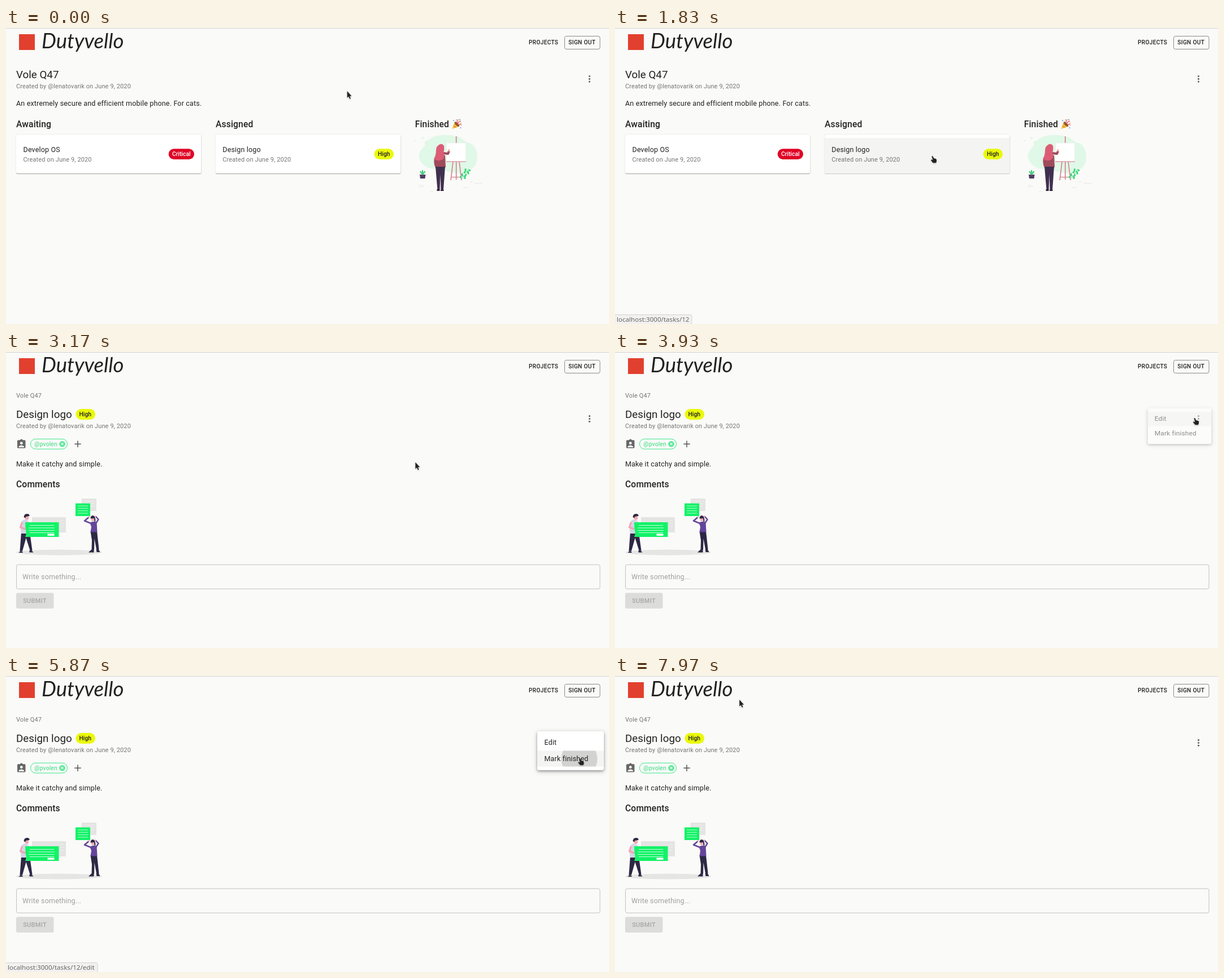
Recreate the animation shown at these times as an HTML page. Size 1067 by 525 pixels, loop 8000 ms.

```html
<!DOCTYPE html>
<html lang="en">
<head>
<meta charset="utf-8">
<title>Task board</title>
<style>
html, body { margin: 0; width: 100%; height: 100%; overflow: hidden; background: #fafaf8; }
svg { display: block; width: 100%; height: 100%; }
text { font-family: Roboto, sans-serif; fill: #212121; white-space: pre; }
.h5 { font-size: 18.8px; }
.h6 { font-size: 15.64px; font-weight: 500; letter-spacing: .009em; }
.b1 { font-size: 12.52px; letter-spacing: .013em; }
.b2 { font-size: 10.95px; letter-spacing: .0125em; fill: #757575; }
.btn { font-size: 10.17px; font-weight: 500; letter-spacing: .0286em; }
.chip { font-size: 10.3px; font-weight: 500; text-anchor: middle; }
.brand { font: italic 36.5px Lato, sans-serif; }
.url { font: 11.6px "Noto Sans", sans-serif; fill: #666; }
.card { fill: #fff; filter: drop-shadow(0 1px .7px rgba(0,0,0,.3)) drop-shadow(0 0 1px rgba(0,0,0,.12)); }
.paper { fill: #fff; filter: drop-shadow(0 2px 2px rgba(0,0,0,.32)) drop-shadow(0 2px 5px rgba(0,0,0,.16)); }
.pointer { filter: drop-shadow(.5px 1px .8px rgba(0,0,0,.22)); }
.pointer path { fill: #222; stroke: #fff; stroke-width: .7; paint-order: stroke; }
</style>
</head>
<body>
<svg viewBox="0 0 1067 525" preserveAspectRatio="none">
  <defs>
    <clipPath id="cardClip"><rect x="371" y="189" width="327.500" height="69.500" rx="3"/></clipPath>
    <clipPath id="rowClip"><rect x="940" y="132.500" width="118" height="28"/></clipPath>
    <g id="dots" fill="#666"><circle r="1.600" cy="-4.800"/><circle r="1.600"/><circle r="1.600" cy="4.800"/></g>
  </defs>
  <rect width="1067" height="525" fill="#fafaf8"/>
  <rect width="1067" height="1" fill="#cfcfcf"/>

  <rect x="23" y="11" width="28" height="28" fill="#e2402f"/>
  <text class="brand" x="63" y="36">Dutyvello</text>
  <text class="btn" x="925" y="29.400">PROJECTS</text>
  <rect x="988.500" y="14.500" width="62.500" height="23" rx="3" fill="none" stroke="#8a8a8a"/>
  <text class="btn" x="995.300" y="29.400">SIGN OUT</text>

  <g id="board">
    <text class="h5" x="18" y="89">Vole Q47</text>
    <text class="b2" x="18" y="106.500">Created by @lenatovarik on June 9, 2020</text>
    <use href="#dots" x="1032.500" y="90.300"/>
    <text class="b1" x="18" y="138">An extremely secure and efficient mobile phone. For cats.</text>
    <text class="h6" x="18" y="175.800">Awaiting</text>
    <text class="h6" x="371" y="175.800">Assigned</text>
    <text class="h6" x="723.700" y="175.800">Finished</text>

    <g id="party">
      <path d="M789.500 179 L794 166.500 L802 174.500 Z" fill="#f6b93b"/>
      <path d="M791.500 173.500 L796.500 176.800 M793 169.500 L800 175.200" stroke="#c98216" stroke-width="1"/>
      <ellipse cx="798" cy="170.500" rx="2.200" ry="5.600" transform="rotate(-45 798 170.500)" fill="#8a5a2b"/>
      <path d="M797 169 Q800 166 797.500 162 M799.500 170.500 Q801 165 805 165.500 M800 172 Q804 169.500 806 172.500" fill="none" stroke="#e0526a" stroke-width="1.300"/>
      <g fill="#4f9be0"><circle cx="792" cy="164" r="1"/><circle cx="803" cy="162.500" r="1"/><circle cx="804.500" cy="177" r="1"/></g>
      <g fill="#e8a62c"><circle cx="800.500" cy="163" r="1"/><circle cx="805" cy="169" r="1"/></g>
    </g>

    <rect class="card" x="18" y="189" width="327.500" height="69" rx="3"/>
    <text class="b1" x="30.500" y="219.700">Develop OS</text>
    <text class="b2" x="30.500" y="237">Created on June 9, 2020</text>
    <rect x="287.700" y="214.300" width="45.300" height="18.800" rx="9.400" fill="#df0526"/>
    <text class="chip" x="310.300" y="227.300" style="fill:#fff">Critical</text>

    <rect class="card" x="371" y="189" width="327.500" height="69" rx="3"/>
    <g clip-path="url(#cardClip)">
      <rect id="cardHover" x="371" y="195" width="327.500" height="64" fill="#f4f4f3"/>
      <circle id="cardRipple" cx="561" cy="230" r="0" fill="#000" opacity=".12"/>
    </g>
    <text class="b1" x="383.300" y="219.700">Design logo</text>
    <text class="b2" x="383.300" y="237">Created on June 9, 2020</text>
    <rect x="651.500" y="214.300" width="34.500" height="18.800" rx="9.400" fill="#eaf90a"/>
    <text class="chip" x="668.800" y="227.300">High</text>

    <g id="painter" fill="none">
      <path d="M731 229 C729 218 738 215 743 205 C750 190 775 187 797 192 C808 195 811 202 820 204 C832 208 835 222 833 236 C830 252 812 257 796 257 C782 258 776 249 760 250 C744 250 733 241 731 229 Z" fill="#e0f8e7"/>
      <g fill="#dff7e6"><circle cx="745" cy="204" r="4"/><circle cx="737" cy="195" r="2"/><circle cx="725" cy="200" r="1.300"/></g>
      <path d="M730 281 h10 M732 279 h4 M809 283 h8 M829 275.500 h14 M821 273 h5 M750 290 h6" stroke="#e3e9e4"/>
      <path d="M796.700 192 V269 M791 237 L787 270 M802 237 L806 270" stroke="#d27f8d" stroke-width="1.600"/>
      <path d="M788 264.500 h17" stroke="#d27f8d" stroke-width="1.200"/>
      <rect x="779.500" y="204" width="34" height="32.500" fill="#fff" stroke="#e9eeea" stroke-width=".6"/>
      <path d="M779 237 h35" stroke="#dba0a9" stroke-width="1.400"/>
      <path d="M774 222 L782 223 L784 218" stroke="#a14b5c" stroke-width="4" stroke-linejoin="round"/>
      <path d="M783 219 L784 215" stroke="#f0a9a7" stroke-width="2.500"/>
      <path d="M758 231 Q768 221 777 226 L778 247 L760 248 Q756 240 758 231 Z" fill="#a04b5b"/>
      <path d="M765 208 Q771 203 775 209 Q776 216 774 221 Q778 230 771 234 Q763 237 757 232 Q761 226 761 217 Q761 211 765 208 Z" fill="#dc5c76"/>
      <path d="M760 246 H777 L774 287 H769.500 L768.700 260 L767.500 287 H763.500 Z" fill="#40304f"/>
      <path d="M762.500 286 h5 v3 h-5 Z M769 287 h5.500 v2 h-5.500 Z" fill="#2c2236"/>
      <path d="M732 260 h10.500 l-1 7 h-8.500 Z" fill="#533c64"/>
      <path d="M737 260 L733 254 M737 260 V252 M737 260 L741.500 254" stroke="#3ecf78" stroke-width="2.200"/>
      <path d="M806 268 Q812 262 819 250" stroke="#59d88c"/>
      <g id="leaves" fill="#34d675"></g>
    </g>
  </g>

  <g id="task">
    <text class="b2" x="18" y="81.300">Vole Q47</text>
    <text class="h5" x="18" y="117">Design logo</text>
    <rect x="123.500" y="101" width="34.500" height="19" rx="9.500" fill="#eaf90a"/>
    <text class="chip" x="140.300" y="114.200">High</text>
    <use href="#dots" x="1032.500" y="118.500"/>
    <text class="b2" x="18" y="135">Created by @lenatovarik on June 9, 2020</text>

    <path d="M21.500 156.300 H25 A2.400 2.400 0 0 1 29.700 156.300 H33 Q34.500 156.300 34.500 157.800 V169 Q34.500 170.500 33 170.500 H21.500 Q20 170.500 20 169 V157.800 Q20 156.300 21.500 156.300 Z" fill="#666"/>
    <circle cx="27.300" cy="161.700" r="2.400" fill="#fafaf8"/>
    <path d="M22.500 169 V167.500 Q27.300 163.500 32 167.500 V169 Z" fill="#fafaf8"/>
    <rect x="43.500" y="154.300" width="65" height="17.800" rx="8.900" fill="none" stroke="#3be585"/>
    <text x="50.300" y="166.700" class="chip" style="text-anchor:start;font-weight:400;letter-spacing:.015em;fill:#35dc7d">@pvolen</text>
    <circle cx="99.500" cy="163.200" r="5.300" fill="#5ee89a"/>
    <path d="M97.500 161.200 l4 4 m0 -4 l-4 4" stroke="#fafaf8" stroke-width="1.100"/>
    <path d="M121.300 163.200 h11.400 M127 157.500 v11.400" stroke="#555" stroke-width="1.500"/>

    <text class="b1" x="18" y="202.500">Make it catchy and simple.</text>
    <text class="h6" x="18" y="240">Comments</text>

    <g id="chat" fill="none">
      <ellipse cx="94" cy="355.500" rx="76" ry="5" fill="#e5e5e4"/>
      <rect x="46" y="293" width="60" height="27" fill="#e4e4e3"/>
      <rect x="134" y="260" width="26" height="22" fill="#e4e4e3"/>
      <path d="M138 264.500 h18 M138 269 h18 M138 273.500 h18 M96 299 h6 M96 304 h6 M96 309 h6" stroke="#f0f0ef"/>
      <path d="M27 320 H42 L46.500 352 H42.500 L35.500 330 L29 353 H24.500 Z" fill="#2d2844"/>
      <path d="M22.500 356 l3 -3 4 1 v2 Z M41.500 352 h4 l3 3.500 h-7 Z" fill="#2d2844"/>
      <path d="M32 297 Q39 297 42 303 L42 322 H27 Q24 309 28 300 Z" fill="#d4d5e6"/>
      <path d="M28.500 302 L25.500 311 L34 314" stroke="#f1a3ad" stroke-width="3" stroke-linejoin="round"/>
      <circle cx="37" cy="294.500" r="3.300" fill="#f3a9b2"/>
      <path d="M31.500 293 Q32 287 37 287 Q42 287 41.500 291 L35 292 L34.500 294.500 Z" fill="#2d2844"/>
      <path d="M34 302 H93.500 V328 H34 Q37 322 34.500 314 Z" fill="#12f267"/>
      <path d="M42 307.500 h43 M40 312 h46 M40 316.500 h46 M42 320.500 h43" stroke="#c4fcd9"/>
      <rect x="73.500" y="322.300" width="12" height="3.600" fill="#fff"/>
      <path d="M149.500 318 H161 L164.500 350 H160 L156.500 331 L156 351 H151.500 L152 334 Z" fill="#2d2844"/>
      <path d="M146 355.500 l5 -5 4.500 0 v5 Z M159.500 350 h4.500 l2.500 5 h-6 Z" fill="#2d2844"/>
      <path d="M148.500 303 Q154 299 160.500 302 L161.500 319.500 H149.500 L151 310 Z" fill="#64459b"/>
      <path d="M150.500 304 L139 299.500 L146.500 293" stroke="#64459b" stroke-width="2.600" stroke-linejoin="round"/>
      <path d="M159 304 L163.500 297 L158.500 291.500" stroke="#64459b" stroke-width="2.400" stroke-linejoin="round"/>
      <path d="M145.500 293.500 l3 -2 M159 292.500 l-2 -2" stroke="#f3a9b2" stroke-width="2"/>
      <circle cx="153.500" cy="297" r="2.900" fill="#f3a9b2"/>
      <path d="M149.500 295.500 Q149.500 290 154 290 Q158.500 291 158.500 300.500 L156.500 301 L156 295 Z" fill="#2d2844"/>
      <rect x="123" y="268.500" width="26" height="22.500" fill="#12f267"/>
      <path d="M127 273 h18 M127 277.300 h18 M127 281.600 h18 M127 286 h18" stroke="#b4fccf"/>
    </g>

    <rect x="18.500" y="377.200" width="1032.500" height="43" rx="3" fill="none" stroke="#c1c1bf"/>
    <text class="b1" x="29" y="403.200" style="fill:#a0a09f">Write something...</text>
    <rect x="18" y="427.300" width="66.500" height="27.700" rx="3" fill="#dcdcda"/>
    <text class="btn" x="30.200" y="444.900" style="font-size:10.950px;fill:#a7a7a5">SUBMIT</text>

    <g id="menu">
      <rect class="paper" x="940" y="98" width="118" height="69" rx="3"/>
      <rect id="rowHover" x="940" width="118" height="28" fill="#f4f4f3"/>
      <g clip-path="url(#rowClip)"><circle id="rowRipple" cx="1014.500" cy="147" r="0" fill="#000"/></g>
      <text class="b1" x="952.500" y="122.300">Edit</text>
      <text class="b1" x="952.500" y="150.600">Mark finished</text>
    </g>
  </g>

  <g id="status">
    <path id="bar" fill="#f2f1f0" stroke="#d3d2d0"/>
    <text id="url" class="url" x="3" y="521"></text>
  </g>

  <g id="pointer" class="pointer">
    <path id="arrow" d="M-.3 0 V11.800 L2.300 9.400 L4.200 13.800 L6 13 L4.200 8.700 H7.600 Z"/>
    <path id="hand" d="M.5 1.500 Q1.800 .4 2.800 2.200 L4.200 5.200 Q8.500 5 9 7.800 V11 L7.800 13.300 H2.800 L.2 10.300 Q-1.800 8 -.3 7.300 L2.300 8.300 Z"/>
  </g>
</svg>

<script>
const LOOP = 8000;
const $ = id => document.getElementById(id);
const set = (id, attrs) => { for (const k in attrs) $(id).setAttribute(k, attrs[k]); };
const show = (id, on) => { $(id).style.display = on ? "" : "none"; };
const ramp = (t, a, b) => Math.min(1, Math.max(0, (t - a) / (b - a)));

// first change, last change, number of changes
const bursts = [
  [1300, 1830, 10], [2130, 2300, 4], [2470, 2630, 4], [3170, 3270, 2],
  [3470, 3670, 4], [3930, 4130, 6], [4600, 4800, 6], [5700, 6230, 15],
  [6730, 6730, 1], [7170, 7170, 1], [7570, 7570, 1], [7870, 7970, 2]
];
const ticks = [0];
for (const [a, b, n] of bursts)
  for (let i = 0; i < n; i++) ticks.push(n > 1 ? a + (b - a) * i / (n - 1) : a);
const lastTick = t => ticks.filter(k => k <= t + .01).pop();

// time, x, y of the pointer's hot spot
const path = [
  [0, 604, 112], [1240, 604, 112], [1650, 560, 226], [3100, 560, 226],
  [3270, 960, 152], [3420, 960, 152], [3670, 1024, 116], [4560, 1024, 116],
  [4800, 1013.5, 145], [6230, 1013.5, 145], [6730, 854, 187], [7170, 707, 203],
  [7570, 540, 143], [7970, 220.5, 42], [LOOP, 220.5, 42]
];
function pointerAt(t) {
  const i = path.findIndex(p => p[0] > t);
  const [a, b] = [path[i - 1], path[i]];
  const u = ramp(t, a[0], b[0]);
  return [a[1] + (b[1] - a[1]) * u, a[2] + (b[2] - a[2]) * u];
}

// cubic-bezier(.4, 0, .2, 1)
function ease(x) {
  let lo = 0, hi = 1;
  for (let i = 0; i < 20; i++) {
    const s = (lo + hi) / 2, r = 1 - s;
    if (1.2 * r * r * s + .6 * r * s * s + s * s * s < x) lo = s; else hi = s;
  }
  return lo * lo * (3 - 2 * lo);
}

for (let i = 0; i < 12; i++) {
  const leaf = document.createElementNS("http://www.w3.org/2000/svg", "circle");
  const side = i % 2 ? 1 : -1, k = i / 11;
  leaf.setAttribute("cx", 807 + 11 * k + side * (2.5 + 1.5 * Math.sin(i * 2)));
  leaf.setAttribute("cy", 266 - 15 * k + side * 1.5);
  leaf.setAttribute("r", 1.7);
  $("leaves").append(leaf);
}

function drawMenu(t, y) {
  const u = Math.min(ramp(t, 3860, 4000), 1 - ramp(t, 6010, 6220));
  const open = t >= 3930 && u > 0;
  show("menu", open);
  if (!open) return;
  const q = 1 - Math.pow(1 - u, 2.4);
  set("menu", {
    opacity: u,
    transform: `translate(1000 121) scale(${.75 + .25 * q} ${.5625 + .4375 * q}) translate(-1000 -121)`
  });
  set("rowHover", { y: y > 132 ? 132.5 : 104.5 });
  set("rowRipple", { r: 80 * ease(ramp(t, 5680, 6230)), opacity: .14 * (1 - ramp(t, 5880, 6430)) });
}

function drawStatus(t) {
  const early = t < 3000;
  const alpha = early
    ? ramp(t, 1600, 1760) * (1 - ramp(t, 2430, 2620))
    : ramp(t, 3940, 4100) * (1 - ramp(t, 6040, 6220));
  const w = early ? 136 : 162;
  $("url").textContent = "localhost:3000/tasks/12" + (early ? "" : "/edit");
  set("bar", { d: `M-2 508.500 H${w - 3} Q${w} 508.500 ${w} 511.500 V527 H-2 Z` });
  set("status", { opacity: alpha });
}

function draw(now) {
  const t = lastTick(now);
  const [x, y] = pointerAt(t);
  const onBoard = t < 2180;
  show("board", onBoard);
  show("task", !onBoard);
  set("cardHover", { opacity: ramp(t, 1500, 1750) });
  set("cardRipple", { r: 195 * ease(ramp(t, 2060, 2610)) });
  drawMenu(t, y);
  drawStatus(t);
  const hand = onBoard ? y > 189 : t > 3580 && t < 6070;
  show("hand", hand);
  show("arrow", !hand);
  set("pointer", { transform: `translate(${x} ${y})` });
}

const start = performance.now();
function frame() {
  draw((performance.now() - start) % LOOP);
  requestAnimationFrame(frame);
}
frame();
</script>
</body>
</html>
```
